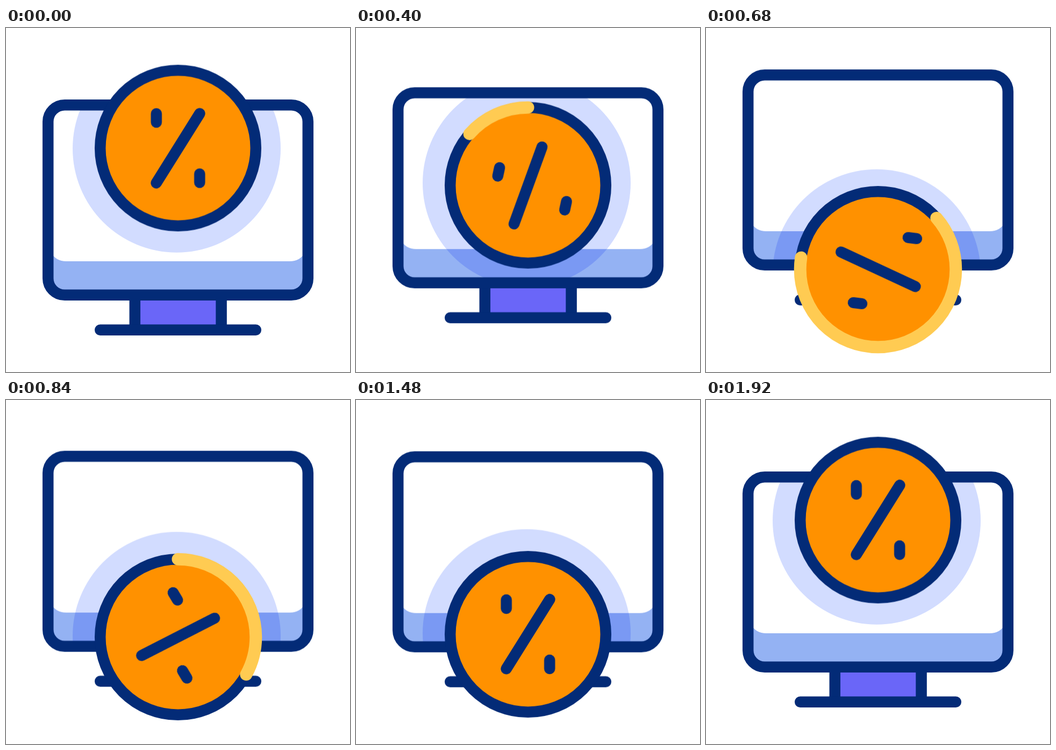
Recreate the animation shown at these times as an HTML page. Size 640 by 640 pixels, loop 2 s.

```html
<!DOCTYPE html>
<html lang="en">
<head>
<meta charset="utf-8">
<title>Discount coin and monitor</title>
<style>
  @property --head { syntax: "<number>"; inherits: false; initial-value: 0; }
  @property --tail { syntax: "<number>"; inherits: false; initial-value: 0; }

  :root {
    --navy: #032b77;
    --orange: #ff9100;
    --yellow: #ffcb52;
    --band: #94b2f3;
    --halo: #d2dcff;
    --purple: #6a66f8;
    --smooth: cubic-bezier(.333, 0, .667, 1);
  }

  html, body { margin: 0; width: 100%; height: 100%; overflow: hidden; background: #fff; }
  svg { display: block; width: 100%; height: 100%; }

  .line { fill: none; stroke: var(--navy); stroke-width: 20.5; stroke-linecap: round; }
  .post { stroke-linecap: butt; }
  .blend { mix-blend-mode: multiply; }

  .desk, .halo, .coin, .slash, .spin, .dot-a, .dot-b {
    animation: 2s var(--smooth) infinite;
  }
  .desk  { animation-name: desk; }
  .halo  { animation-name: halo; fill: var(--halo); }
  .coin  { animation-name: coin; }
  .slash { animation-name: slash; }
  .spin  { animation-name: spin; }
  .dot-a { animation-name: dot-a; animation-timing-function: linear; }
  .dot-b { animation-name: dot-b; animation-timing-function: linear; }

  .arc {
    fill: none;
    stroke: var(--yellow);
    stroke-width: 23;
    stroke-linecap: round;
    stroke-dasharray: calc(var(--head) - var(--tail)) 800;
    stroke-dashoffset: calc(var(--tail) * -1);
    animation: head 2s var(--smooth) infinite,
               tail 2s var(--smooth) infinite,
               show 2s step-end infinite;
  }

  @keyframes desk {
    0%, 14%  { transform: translateY(0); }
    29%      { transform: translateY(-64.5px); }
    42%, 72% { transform: translateY(-38.5px); }
    94.1%, 100% { transform: translateY(0); }
  }
  @keyframes halo {
    0%, 14%  { transform: translateY(0); }
    31.5%    { transform: translateY(235px); }
    42%, 72% { transform: translateY(214.5px); }
    94.1%, 100% { transform: translateY(0); }
  }
  @keyframes coin {
    0%, 14%  { transform: translateY(0); }
    30.5%    { transform: translateY(230.2px); }
    39%, 72% { transform: translateY(217.5px); }
    94.1%, 100% { transform: translateY(0); }
  }
  @keyframes slash {
    0%, 14%   { transform: rotate(0deg); }
    52%, 100% { transform: rotate(-180deg); }
  }
  @keyframes spin {
    0%, 14%   { transform: rotate(0deg); }
    52%, 100% { transform: rotate(180deg); }
  }

  /* The two dots trade places on uneven orbits while staying unrotated. */
  @keyframes dot-a {
    0%, 14%   { transform: rotate(54.3deg) translateX(-69px) rotate(-54.3deg); }
    20%       { transform: rotate(24.6deg) translateX(-60px) rotate(-24.6deg); }
    34%       { transform: rotate(-59deg) translateX(-73.6px) rotate(59deg);
                animation-timing-function: cubic-bezier(.3, .45, .67, 1); }
    52%, 100% { transform: rotate(-125.7deg) translateX(-69px) rotate(125.7deg); }
  }
  @keyframes dot-b {
    0%, 14%   { transform: rotate(54.3deg) translateX(69px) rotate(-54.3deg); }
    20%       { transform: rotate(28.5deg) translateX(79.6px) rotate(-28.5deg); }
    34%       { transform: rotate(-42.2deg) translateX(86.4px) rotate(42.2deg);
                animation-timing-function: cubic-bezier(.3, .45, .67, 1); }
    52%, 100% { transform: rotate(-125.7deg) translateX(69px) rotate(125.7deg); }
  }

  @keyframes head { 0%, 14% { --head: 0; } 40%, 100% { --head: 360; } }
  @keyframes tail { 0%, 26% { --tail: 0; } 52%, 100% { --tail: 360; } }
  @keyframes show {
    0%    { opacity: 0; }
    14.1% { opacity: 1; }
    51.9%, 100% { opacity: 0; }
  }
</style>
</head>
<body>
<svg viewBox="0 0 640 640">
  <defs>
    <clipPath id="screen">
      <rect class="desk" x="78.2" y="143.2" width="483.6" height="353.6" rx="31"/>
    </clipPath>
  </defs>

  <g class="desk">
    <rect x="240" y="497" width="160.5" height="60" fill="var(--purple)"/>
    <path class="line post" d="M239.8 497V561M400.6 497V561"/>
    <path class="line" d="M175.2 561.7H464.8"/>
    <path fill="var(--band)" d="M84 418Q93 434 112 434H528Q547 434 556 418V466Q556 492 530 492H110Q84 492 84 466Z"/>
  </g>

  <g class="blend" clip-path="url(#screen)">
    <circle class="halo" cx="317.5" cy="224.2" r="193.5"/>
  </g>

  <g class="desk">
    <rect class="line" x="78.2" y="143.2" width="483.6" height="353.6" rx="31"/>
  </g>

  <g class="coin">
    <g transform="translate(320 223.4)">
      <circle class="line" r="144.8" style="fill: var(--orange)"/>
      <path class="arc" pathLength="360" d="M0-144.8A144.8 144.8 0 0 0 0 144.8A144.8 144.8 0 0 0 0-144.8"/>
      <path class="line slash" d="M40.4-64.3L-40.4 64.9"/>
      <g class="dot-a"><path class="line spin" d="M0-8V8"/></g>
      <g class="dot-b"><path class="line spin" d="M0-8V8"/></g>
    </g>
  </g>
</svg>
<script>
  // Hold every animation on a shared clock of 25 steps per second.
  const STEP = 40, LOOP = 2000, LEAD = 8;
  const tracks = document.getAnimations();
  const start = performance.now();
  tracks.forEach(track => track.pause());

  function tick() {
    const time = (performance.now() - start + LEAD) % LOOP;
    const held = Math.floor(time / STEP) * STEP;
    tracks.forEach(track => { track.currentTime = held; });
    requestAnimationFrame(tick);
  }
  tick();
</script>
</body>
</html>
```
